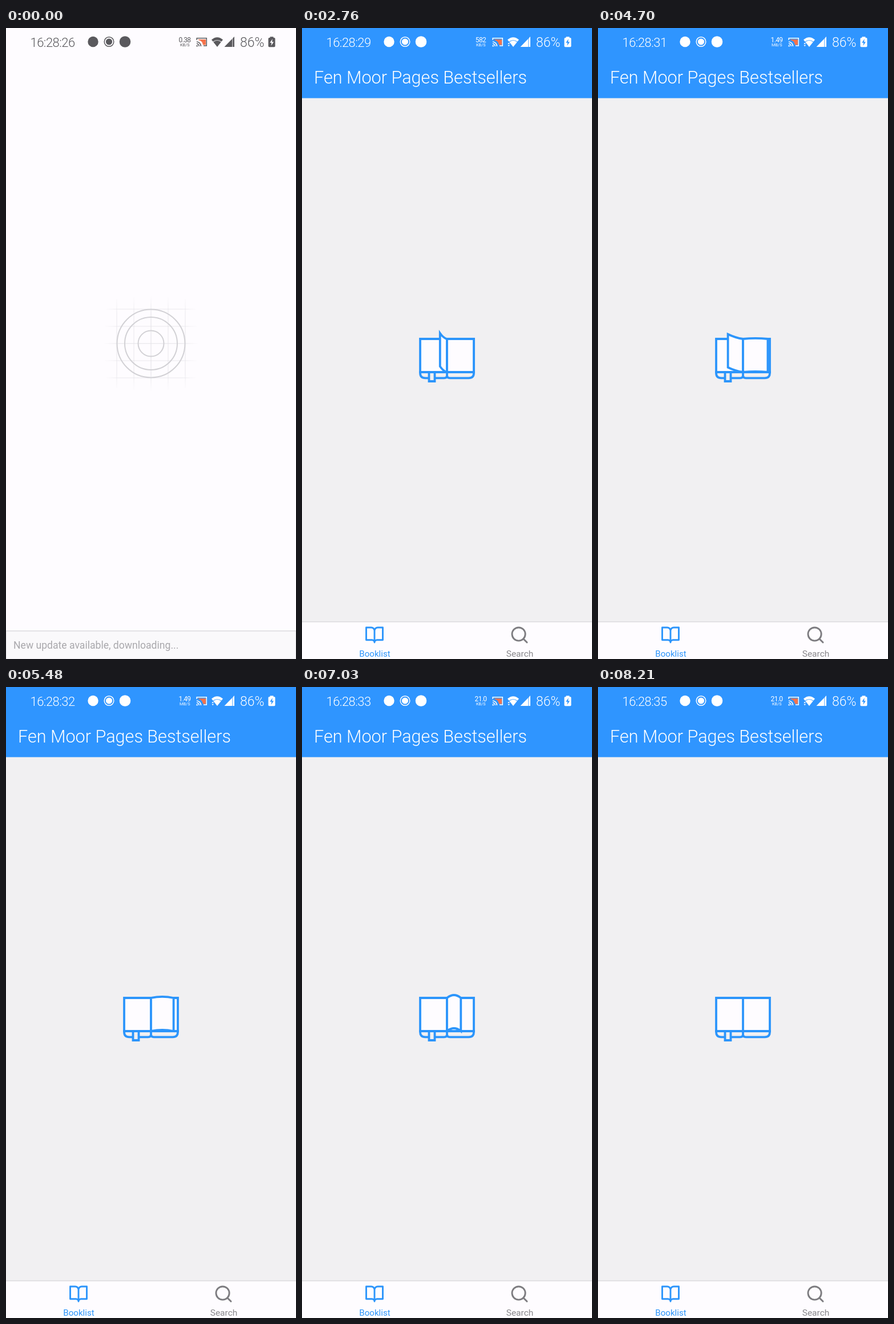
An HTML page for the animation above (8330 ms loop, 508x1102 px).

```html
<!DOCTYPE html>
<html lang="en">
<head>
<meta charset="utf-8">
<title>Booklist loading</title>
<style>
  html, body { margin: 0; width: 100%; height: 100%; overflow: hidden; background: #fefcff; }
  svg { display: block; width: 508px; height: 1102px; font-family: Roboto, Inter, sans-serif; }
  #status { color: #5a595d; --bg: #fefcff; fill: currentColor; }
  #status.light { color: #fff; --bg: #2f95ff; }
  #book { stroke: #2c95fb; stroke-width: 3.8; }
  .line { fill: none; stroke: currentColor; }
  .tab { fill: none; stroke-width: 2; stroke-linecap: round; stroke-linejoin: round; }
  .thin { font-weight: 300; }
  .mid { text-anchor: middle; }
</style>
</head>
<body>
<svg viewBox="0 0 508 1102">
  <defs>
    <linearGradient id="fadeX" gradientUnits="userSpaceOnUse" x1="170" y1="0" x2="338" y2="0">
      <stop offset="0" stop-color="#e3e2e6" stop-opacity="0"/>
      <stop offset=".18" stop-color="#e3e2e6"/>
      <stop offset=".82" stop-color="#e3e2e6"/>
      <stop offset="1" stop-color="#e3e2e6" stop-opacity="0"/>
    </linearGradient>
    <linearGradient id="fadeY" href="#fadeX" gradientUnits="userSpaceOnUse" x1="0" y1="467" x2="0" y2="635"/>
    <g id="dot">
      <circle r="8.3" class="line" stroke-width="1.5"/>
      <circle r="5.6"/>
    </g>
  </defs>

  <g id="splash">
    <rect width="508" height="1102" fill="#fefcff"/>
    <g id="grid" stroke-width="1"></g>
    <g fill="none" stroke="#d2d1d5" stroke-width="2">
      <circle cx="254" cy="551" r="59.5"/>
      <circle cx="254" cy="551" r="46"/>
      <circle cx="254" cy="551" r="22.5"/>
    </g>
    <g id="banner">
      <rect x=".5" y="1053" width="507" height="49" fill="#faf9fb" stroke="#e6e5e9"/>
      <path d="M0 1053H508" stroke="#dfdee2" stroke-width="1.6"/>
      <text x="13" y="1084" font-size="17.6" fill="#a9a8ac">New update available, downloading...</text>
    </g>
  </g>

  <g id="app">
    <rect width="508" height="1102" fill="#f1f0f2"/>
    <rect width="508" height="122.5" fill="#2f95ff"/>
    <text x="21" y="97" font-size="30.6" font-weight="350" fill="#fff">Fen Moor Pages Bestsellers</text>

    <g id="book" fill="none">
      <path d="M207 543H301V601H207Z" fill="#fefcff"/>
      <path d="M254 543V608"/>
      <g id="pages" fill="#fefcff"></g>
      <path d="M207 601V602.5Q207 611.3 216 611.3H249Q254 611.3 254 607Q254 611.3 259 611.3H292Q301 611.3 301 602.5V601"/>
      <path d="M222.5 601V617H232.5V601" fill="#f1f0f2"/>
      <path d="M205 601H303"/>
    </g>

    <rect y="1036" width="508" height="2" fill="#e2e1e4"/>
    <rect y="1038" width="508" height="64" fill="#fefcff"/>
    <g class="tab" stroke="#2c95fb" transform="translate(109.6 1042.6) scale(1.45)">
      <path d="M2 3h6a4 4 0 0 1 4 4v14a3 3 0 0 0-3-3H2zM22 3h-6a4 4 0 0 0-4 4v14a3 3 0 0 1 3-3h7z"/>
    </g>
    <g class="tab" stroke="#7d7c80" transform="translate(363.6 1042.6) scale(1.45)">
      <circle cx="11" cy="11" r="8"/>
      <path d="M21 21l-4.35-4.35"/>
    </g>
    <text class="mid" x="127.5" y="1098" font-size="15.1" fill="#2c95fb">Booklist</text>
    <text class="mid" x="381.5" y="1098" font-size="15.5" fill="#89888c">Search</text>
  </g>

  <g id="status">
    <text id="clock" class="thin" x="42.5" y="32.5" font-size="22" letter-spacing="-.55"></text>
    <circle cx="152.5" cy="24" r="9.2"/>
    <use href="#dot" x="180.5" y="24"/>
    <use id="extra" href="#dot" x="208.5" y="24"/>
    <circle id="last" cy="24" r="9.8"/>
    <text id="rate" class="mid" x="313" y="25" font-size="12" letter-spacing="-.6"></text>
    <text id="unit" class="mid" x="313.3" y="32" font-size="7.4"></text>

    <path d="M337 20H350V29.5H345Q344 22 337 21Z" fill="#f6734c"/>
    <path class="line" stroke-width="1.5" d="M334.2 21V17.7H351.3V31H346M334 24Q341 25 341.5 32M334 27.2Q338 28 338.3 32"/>
    <circle cx="334.7" cy="31.2" r="1.2"/>

    <path d="M360 20.5Q370 12 380 20.5L377.4 23.7Q370 19 362.6 23.7Z"/>
    <path d="M363.2 24.4Q370 19.8 376.8 24.4L370 33Z"/>
    <path id="arrows" d="M360.4 28L362.2 25.6L364 28ZM360.4 29.8H364L362.2 32.2Z"/>
    <path d="M382.5 33L400 15V33Z"/>
    <path d="M396.8 16V33" stroke="var(--bg)" stroke-width=".8"/>
    <text class="thin" x="410" y="33" font-size="23">86%</text>
    <rect x="462.5" y="15.3" width="6" height="3"/>
    <rect x="459.5" y="17" width="12" height="16.3" rx="1.8"/>
    <path d="M466.8 19L462.2 25.8H465.2L464.4 31L469 24.2H466Z" fill="var(--bg)"/>
  </g>
</svg>
<script>
const LOOP = 8330, APP_AT = 2550;
const FLIP_STARTS = [2526, 3958, 5412, 6903];
const PAGES = 4, PAGE_GAP = 232, PAGE_TIME = 400;
const RATES = [[0, '0.38', 'KB/S'], [450, '582', 'KB/S'], [3420, '1.49', 'MB/S'], [6420, '21.0', 'KB/S']];

const $ = id => document.getElementById(id);
const clamp = (v, lo = 0, hi = 1) => Math.min(hi, Math.max(lo, v));
const mix = (a, b, k) => a + (b - a) * k;
const smooth = k => k * k * (3 - 2 * k);
const ramp = (t, from, to) => smooth(clamp((t - from) / (to - from)));
const show = (el, on) => { el.style.display = on ? '' : 'none'; };

function add(parent, attrs) {
  const el = document.createElementNS('http://www.w3.org/2000/svg', 'path');
  for (const name in attrs) el.setAttribute(name, attrs[name]);
  return parent.appendChild(el);
}

// Grid lines are thin filled bars that fade out at both ends.
for (let i = -2; i <= 2; i++) {
  const half = 84 - Math.abs(i) * 3, x = 254 + i * 30, y = 551 + i * 30;
  const opacity = i ? .75 : 1;
  add($('grid'), { d: `M${x - .5} ${551 - half}h1v${2 * half}h-1z`, fill: 'url(#fadeY)', opacity });
  add($('grid'), { d: `M${254 - half} ${y - .5}v1h${2 * half}v-1z`, fill: 'url(#fadeX)', opacity });
}

const pages = Array.from({ length: PAGES }, () => add($('pages'), {}));

// Outline of a page turned by u, from 0 (flat right) to 1 (flat left).
function pagePath(u) {
  const x = 301 - 94 * u;
  const lift = Math.min(10, Math.max(0, (u - .25) * 38), (1 - u) * 38);
  const bulge = u < .3 ? Math.min(28 * u, 5)
    : u < .6 ? mix(5, -2, (u - .3) / .3)
    : -5 * (1 - u);
  const cx = (254 + x) / 2, cy = 543 - lift / 2 - 2 * bulge;
  return `M254 543Q${cx} ${cy} ${x} ${543 - lift}V${601 - lift}Q${cx} ${cy + 58} 254 601Z`;
}

function drawBook(t) {
  const start = FLIP_STARTS.findLast(s => s <= t) ?? LOOP;
  pages.forEach((page, i) => {
    const k = (t - start - i * PAGE_GAP) / PAGE_TIME;
    const on = k > 0 && k < 1;
    show(page, on);
    if (on) page.setAttribute('d', pagePath(smooth(k)));
  });
}

function drawStatus(t) {
  $('status').classList.toggle('light', t >= APP_AT);
  $('clock').textContent = '16:28:' + (26 + Math.floor((t + 790) / 1000));
  const [, rate, unit] = RATES.findLast(r => r[0] <= t);
  $('rate').textContent = rate;
  $('unit').textContent = unit;
  show($('arrows'), t >= 670);
  const slide = ramp(t, 10, 270) - ramp(t, 1680, 1790);
  $('last').setAttribute('cx', 208.5 + 28 * slide);
  $('extra').setAttribute('opacity', ramp(t, 100, 330) - ramp(t, 1670, 1760));
}

function draw(now) {
  const t = now % LOOP;
  show($('splash'), t < APP_AT);
  show($('app'), t >= APP_AT);
  show($('banner'), t < 1580);
  drawStatus(t);
  drawBook(t);
}

const origin = performance.now();
function tick() {
  draw(performance.now() - origin);
  requestAnimationFrame(tick);
}
tick();
</script>
</body>
</html>
```
